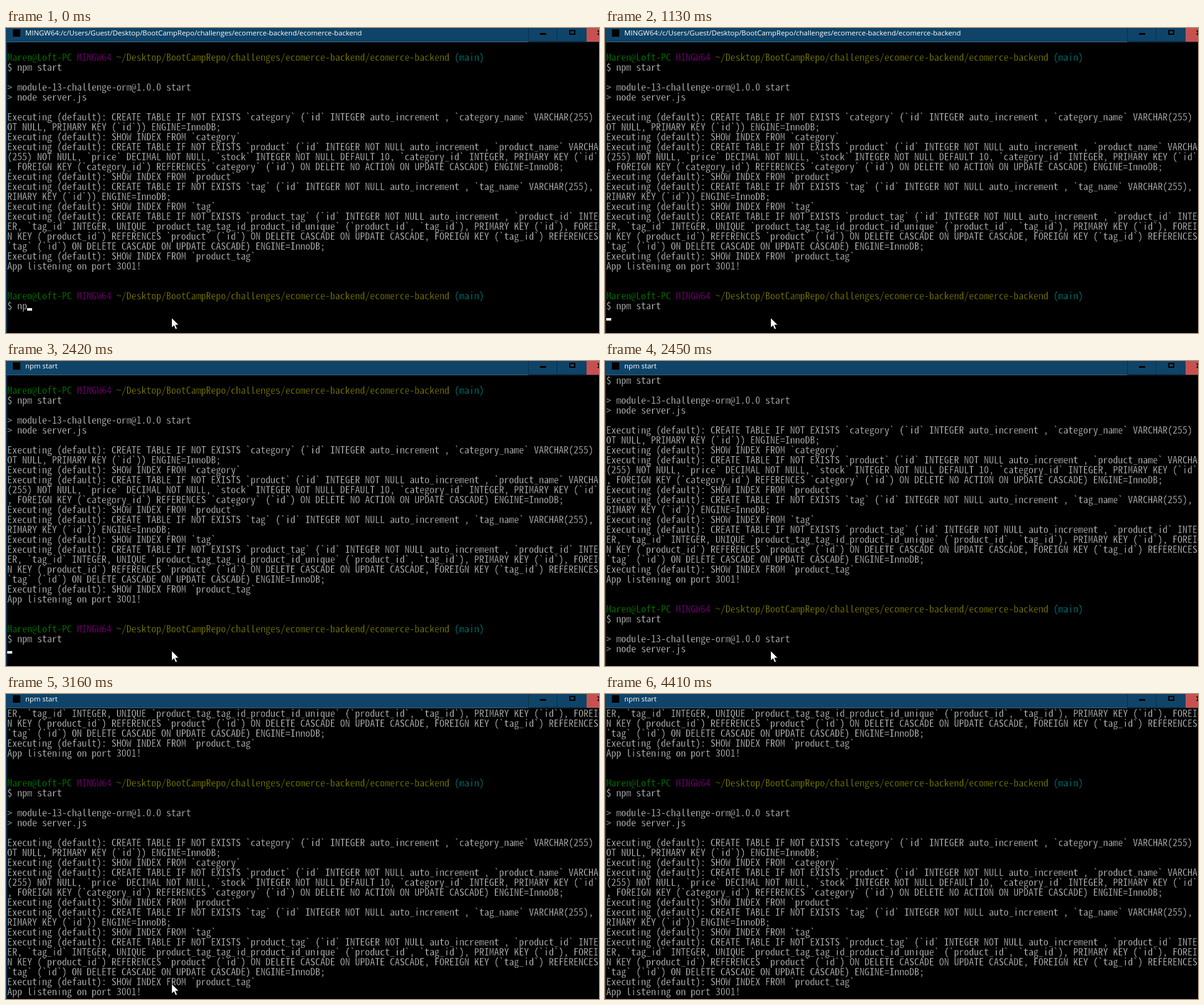
These frames come from a looping animation (954x491 px, 5.3 s). An HTML page:

```html
<!DOCTYPE html>
<html lang="en">
<head>
<meta charset="utf-8">
<title>Terminal</title>
<style>
  html, body { margin: 0; width: 100%; height: 100%; overflow: hidden; background: #000; }
  svg { display: block; width: 954px; height: 491px; }
  /* The background-coloured outline thins the strokes to about one pixel. */
  #log text {
    font-family: "Noto Sans Mono CJK JP", "Noto Sans CJK JP", "Liberation Mono", monospace;
    font-weight: 300; white-space: pre; fill: #c8c8c8; stroke: #000; stroke-width: .3px;
  }
  #log .user { fill: #008000; }
  #log .sys { fill: #800080; }
  #log .path { fill: #808000; }
  #log .branch { fill: #008080; }
  #title { font: 11.4px "Open Sans", "Noto Sans", sans-serif; fill: #fff; }
</style>
</head>
<body>
<svg viewBox="0 0 954 491">
  <rect width="954" height="491"/>
  <g id="log"></g>
  <rect id="caret" width="8" height="4" fill="#fff"/>

  <!-- window frame -->
  <rect width="954" height="22" fill="#0f4468"/>
  <rect y="22" width="840" height="1" fill="#3c6078"/>
  <rect x="840" y="22" width="114" height="1" fill="#0a2f48"/>
  <rect width="1.5" height="491" fill="#0f4468"/>
  <rect x="11" y="2" width="12" height="12"/>
  <text id="title" x="31" y="12"></text>
  <path d="M840.5 0V21.5H934M886.5 0V21" fill="none" stroke="#0a2f48"/>
  <rect x="859" y="8" width="10" height="3"/>
  <path d="M907 4H915V10H907Z" fill="none" stroke="#000" stroke-width="2"/>
  <rect x="934" width="20" height="22" fill="#c75050"/>
  <path d="M952 4L958 11M952 11L958 4" stroke="#000" stroke-width="2"/>

  <path id="mouse" d="M.5 .5V16.6L4.2 13.1L6.8 19.2L9.4 18.1L6.8 12.1H12Z" fill="#fff" stroke="#000" stroke-width=".8"/>
</svg>
<script>
const LOOP = 5300, CELL = 8, ROW = 16, LEFT = 2, TOP = 23, COLS = 120;
const $ = id => document.getElementById(id);
const log = $('log'), caret = $('caret'), title = $('title'), mouse = $('mouse');

const dir = '/Desktop/BootCampRepo/challenges/ecomerce-backend/ecomerce-backend';
const prompt = [['user', 'Maren@Loft-PC '], ['sys', 'MINGW64 '], ['path', '~' + dir + ' '], ['branch', '(main)']];
const run = label => 'Executing (default): ' + label;
const create = (table, cols) => run(`CREATE TABLE IF NOT EXISTS \`${table}\` (${cols}) ENGINE=InnoDB;`);
const index = table => run(`SHOW INDEX FROM \`${table}\``);
const output = [
  '',
  '> module-13-challenge-orm@1.0.0 start',
  '> node server.js',
  '',
  create('category', '`id` INTEGER auto_increment , `category_name` VARCHAR(255) NOT NULL, PRIMARY KEY (`id`)'),
  index('category'),
  create('product', '`id` INTEGER NOT NULL auto_increment , `product_name` VARCHAR(255) NOT NULL, `price` DECIMAL NOT NULL, `stock` INTEGER NOT NULL DEFAULT 10, `category_id` INTEGER, PRIMARY KEY (`id`), FOREIGN KEY (`category_id`) REFERENCES `category` (`id`) ON DELETE NO ACTION ON UPDATE CASCADE'),
  index('product'),
  create('tag', '`id` INTEGER NOT NULL auto_increment , `tag_name` VARCHAR(255), PRIMARY KEY (`id`)'),
  index('tag'),
  create('product_tag', '`id` INTEGER NOT NULL auto_increment , `product_id` INTEGER, `tag_id` INTEGER, UNIQUE `product_tag_tag_id_product_id_unique` (`product_id`, `tag_id`), PRIMARY KEY (`id`), FOREIGN KEY (`product_id`) REFERENCES `product` (`id`) ON DELETE CASCADE ON UPDATE CASCADE, FOREIGN KEY (`tag_id`) REFERENCES `tag` (`id`) ON DELETE CASCADE ON UPDATE CASCADE'),
  index('product_tag'),
  'App listening on port 3001!'
].flatMap(s => s.match(new RegExp(`.{1,${COLS}}`, 'g')) || ['']);

const COMMAND = 'npm start', CMD_ROW = 26;
const rows = ['', prompt, '$ ' + COMMAND, ...output, '', '', prompt, '$ ', ...output];

// Pick the font size that makes one character exactly one cell wide.
function fitSize() {
  const probe = addRow('0'.repeat(100), 0);
  probe.style.fontSize = '16px';
  const size = 16 * CELL * 100 / probe.getComputedTextLength();
  probe.remove();
  return size;
}

function addRow(content, i) {
  const make = (tag, parent) => parent.appendChild(document.createElementNS('http://www.w3.org/2000/svg', tag));
  const text = make('text', log);
  text.setAttribute('x', LEFT);
  text.setAttribute('y', TOP + i * ROW + 14);
  if (typeof content === 'string') text.textContent = content;
  else for (const [kind, part] of content) {
    const span = make('tspan', text);
    span.setAttribute('class', kind);
    span.textContent = part;
  }
  return text;
}

log.style.fontSize = fitSize() + 'px';
const lines = rows.map(addRow);

// Each track lists [start time, value]; a value holds until the next start.
const tracks = {
  typed: [[0, 2], [90, 3], [130, 4], [320, 5], [400, 6], [490, 7], [570, 8], [820, 9]],
  title: [[0, 'MINGW64:/c/Users/Guest' + dir], [1460, 'npm'], [1860, 'npm prefix'], [2020, 'npm'], [2420, 'npm start']],
  blink: [[0, 1], [1800, 0], [2330, 1], [2450, 0]],
  scroll: [[0, 0], [2450, 2], [3090, 4], [3160, 18]],
  printed: [[0, 27], [2450, 30], [3090, 33], [3160, rows.length]],
  mouse: [[0, [266, 466]], [4300, [261, 463]], [4360, [361, 478]], [4410, [361, 500]]]
};
const at = (name, t) => tracks[name].findLast(([start]) => start <= t)[1];
const setText = (el, s) => { if (el.textContent !== s) el.textContent = s; };
const move = (el, x, y) => el.setAttribute('transform', `translate(${x} ${y})`);

function draw(t) {
  const typed = at('typed', t), printed = at('printed', t), scroll = at('scroll', t);
  setText(title, at('title', t));
  setText(lines[CMD_ROW], '$ ' + COMMAND.slice(0, typed));
  lines.forEach((line, i) => line.setAttribute('visibility', i >= scroll && i < printed ? 'visible' : 'hidden'));
  move(log, 0, -ROW * scroll);

  const entered = t >= 1130;
  const col = entered ? 0 : typed + 2, row = CMD_ROW + (entered ? 1 : 0);
  move(caret, LEFT + col * CELL, TOP + (row + 1) * ROW - 4);
  caret.setAttribute('opacity', at('blink', t));
  move(mouse, ...at('mouse', t));
}

const begin = performance.now();
function tick() {
  draw((performance.now() - begin) % LOOP);
  requestAnimationFrame(tick);
}
tick();
</script>
</body>
</html>
```
